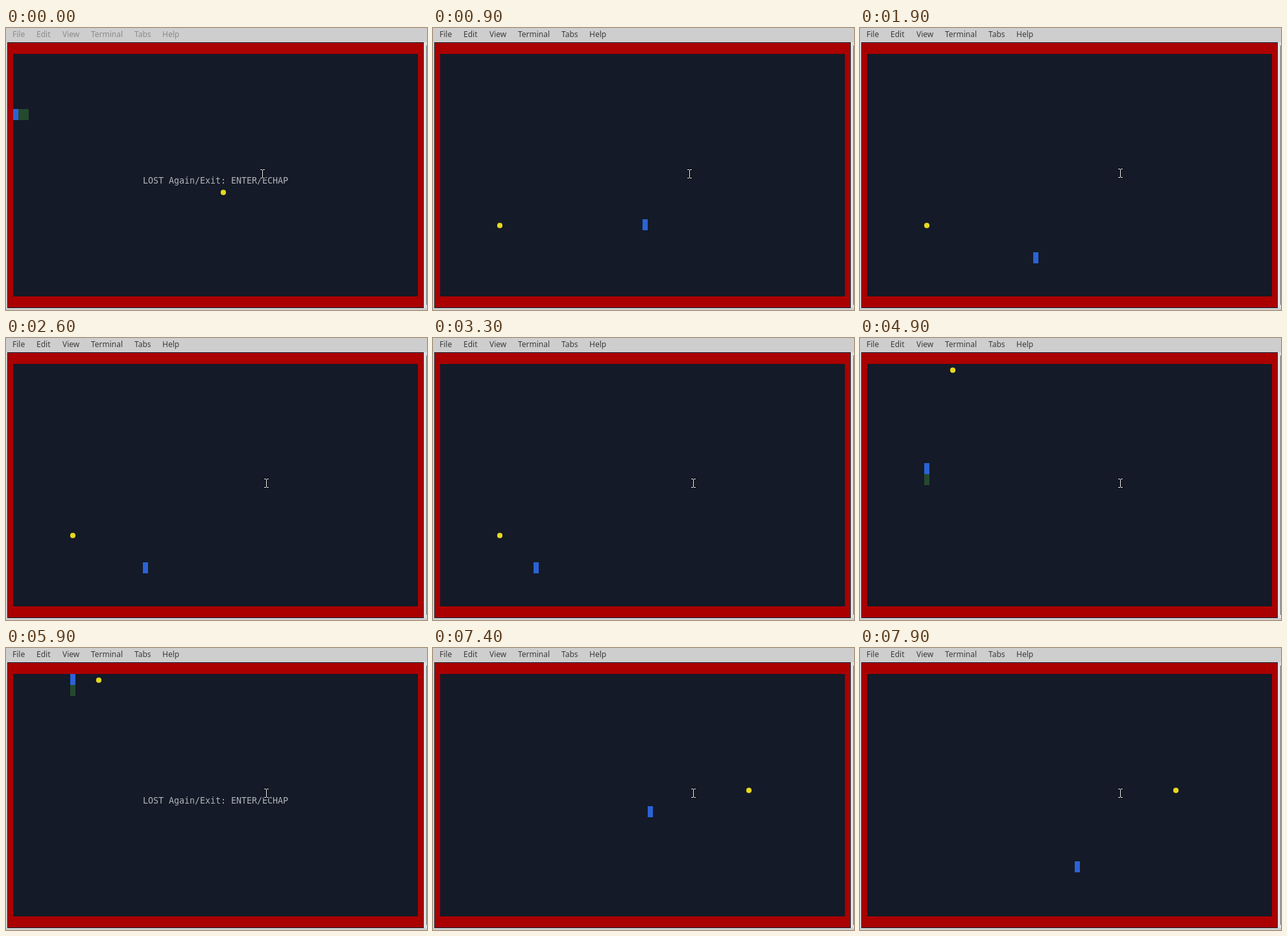
Recreate the animation shown at these times as an HTML page with a canvas. Size 649 by 435 pixels, loop 8000 ms.

```html
<!DOCTYPE html>
<html lang="en">
<head>
<meta charset="utf-8">
<title>Terminal snake</title>
<style>
  html, body { margin: 0; width: 100%; height: 100%; overflow: hidden; background: #cecece; }
  canvas { display: block; }
</style>
</head>
<body>
<canvas id="stage" width="649" height="435"></canvas>
<script>
const ctx = document.getElementById('stage').getContext('2d');
const LOOP = 8000, STEP = 100;
const CELL_W = 8, CELL_H = 17, LEFT = 11, TOP = 40;
const MENU = [['File', 10], ['Edit', 47], ['View', 87], ['Terminal', 131], ['Tabs', 198], ['Help', 241]];

// Head positions [time, column, row] at the corners of each run
const RUN_1 = [[600, 39, 12], [1200, 39, 18], [4000, 11, 18], [5800, 11, 0]];
const RUN_2 = [[7400, 40, 12], [8000, 40, 18]];

function rect(color, x, y, w, h) {
  ctx.fillStyle = color;
  ctx.fillRect(x, y, w, h);
}

function text(str, x, y, font, color) {
  ctx.font = font;
  ctx.fillStyle = color;
  ctx.fillText(str, x, y);
}

function cell(color, [col, row]) {
  rect(color, LEFT + col * CELL_W, TOP + row * CELL_H, CELL_W, CELL_H);
}

function headAt(path, t) {
  for (let i = 1; i < path.length; i++) {
    const [t0, c0, r0] = path[i - 1], [t1, c1, r1] = path[i];
    if (t <= t1) {
      const k = (t - t0) / (t1 - t0);
      return [Math.round(c0 + (c1 - c0) * k), Math.round(r0 + (r1 - r0) * k)];
    }
  }
  return path[path.length - 1].slice(1);
}

function gameAt(t) {
  if (t < 600) return { snake: [[0, 5], [1, 5], [2, 5]], food: [40, 12], lost: true };
  if (t >= 7400) return { snake: [headAt(RUN_2, t)], food: [59, 10] };
  const head = headAt(RUN_1, t);
  const eaten = t >= 4300;
  return {
    snake: eaten ? [head, [head[0], head[1] + 1]] : [head],
    food: eaten ? [16, 0] : [11, 15],
    lost: t >= 5900
  };
}

function drawWindow(t) {
  rect('#cecece', 0, 0, 649, 435);
  rect('#e0e0e0', 644, 22, 5, 410);
  rect('#6b6b6b', 648, 27, 1, 400);
  for (const [label, x] of MENU) {
    text(label, x, 14, '12px "Noto Sans", sans-serif', t < 400 ? '#8b8b8b' : '#3c3c3c');
  }
  rect('#141a27', 2, 22, 642, 410);
  rect('#aa0000', 3, 23, 640, 408);
  rect('#141a27', LEFT, TOP, 624, 374);
}

function drawGame({ snake, food, lost }) {
  snake.forEach((part, i) => cell(i ? '#24492e' : '#2b62d4', part));
  ctx.fillStyle = '#e6d822';
  ctx.beginPath();
  ctx.arc(LEFT + food[0] * CELL_W + 4, TOP + food[1] * CELL_H + 9.7, 4.1, 0, Math.PI * 2);
  ctx.fill();
  if (lost) {
    text('LOST Again/Exit: ENTER/ECHAP', 211, 240, '13.29px "DejaVu Sans Mono", monospace', '#b0b6ba');
  }
}

function drawPointer(x, y) {
  const bars = [[-3, 0, 3, 1], [1, 0, 3, 1], [0, 1, 1, 12], [-3, 13, 3, 1], [1, 13, 3, 1]];
  for (const [dx, dy, w, h] of bars) rect('#0a0d14', x + dx - 1, y + dy - 1, w + 2, h + 2);
  for (const [dx, dy, w, h] of bars) rect('#f4f4f4', x + dx, y + dy, w, h);
}

function frame() {
  const t = Math.floor(performance.now() % LOOP / STEP) * STEP;
  drawWindow(t);
  drawGame(gameAt(t));
  if (t < 1700) drawPointer(395, 218);
  else drawPointer(401, 217);
  requestAnimationFrame(frame);
}
frame();
</script>
</body>
</html>
```
